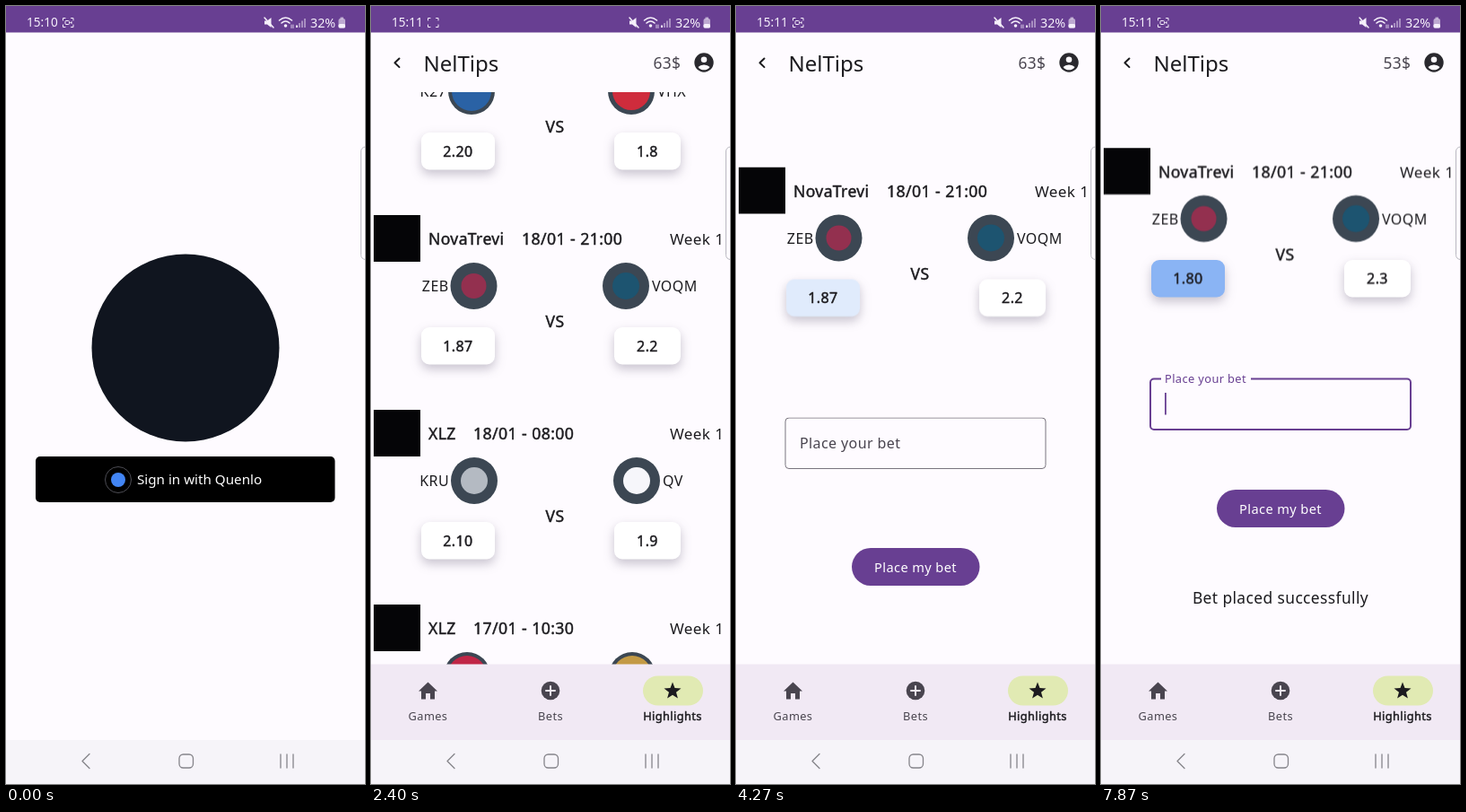
These frames come from a looping animation (400 px wide and 867 px high, 8 s). An HTML page:

```html
<!DOCTYPE html>
<html lang="en">
<head>
<meta charset="utf-8">
<title>Betting app</title>
<style>
  html, body { margin: 0; width: 100%; height: 100%; overflow: hidden; background: #fefbff; }
  svg { display: block; width: 100%; height: 100%; }
  text { font-family: "Noto Sans", "Open Sans", sans-serif; white-space: pre; }
  .raised { filter: drop-shadow(0 5px 6px rgba(50, 45, 75, .27)); }
  .line { fill: none; stroke-linecap: round; stroke-linejoin: round; }
</style>
</head>
<body>
<svg id="stage" viewBox="0 0 400 867"></svg>
<script>
const LOOP = 8000;
const INK = '#1c1b1f', SOFT = '#49454f', PURPLE = '#683f92', PAPER = '#fefbff', PALE = '#f6f0fb';
const WHITE = '#fff', SURFACE = '#f1e9f4', SLATE = '#3c4753';

// Drawing helpers
const attrs = o => Object.entries(o).map(([k, v]) => `${k}="${v}"`).join(' ');
const rect = (x, y, width, height, fill, rx = 0, more = {}) =>
  `<rect ${attrs({ x, y, width, height, fill, rx, ...more })}/>`;
const disc = (cx, cy, r, fill, more = {}) => `<circle ${attrs({ cx, cy, r, fill, ...more })}/>`;
const line = (d, stroke, width = 1.3, more = {}) =>
  `<path class="line" ${attrs({ d, stroke, 'stroke-width': width, ...more })}/>`;
const shape = (d, fill, more = {}) => `<path ${attrs({ d, fill, ...more })}/>`;
const group = (id, ...parts) => `<g id="${id}">${parts.join('')}</g>`;
// y is the middle of the capitals
const text = (x, y, size, str, more = {}) =>
  `<text ${attrs({ x, y: y + size * .36, 'font-size': size, fill: INK, 'letter-spacing': .4, ...more })}>${str}</text>`;
const mid = { 'text-anchor': 'middle' }, end = { 'text-anchor': 'end' }, tight = { 'letter-spacing': 0 };
// A hairline outline gives the medium weight
const medium = { stroke: INK, 'stroke-width': .45 };

// Match cards; a team is [name, avatar centre, mark colour, mark radius]
const matches = [
  { league: 'Vento League', dateX: 198, date: '18/01 - 21:00', odds: ['2.20', '1.8'],
    home: ['K27', 112, '#2a62a5', 22], away: ['VHX', 290, '#cf2c3c', 21] },
  { league: 'NovaTrevi', dateX: 168, date: '18/01 - 21:00', odds: ['1.87', '2.2'],
    home: ['ZEB', 114.5, '#93304f', 14], away: ['VOQM', 284, '#1d5470', 15] },
  { league: 'XLZ', dateX: 114, date: '18/01 - 08:00', odds: ['2.10', '1.9'],
    home: ['KRU', 115, '#b4bac2', 15], away: ['QV', 296, '#f6f6fa', 15] },
  { league: 'XLZ', dateX: 114, date: '17/01 - 10:30', odds: ['', ''],
    home: ['', 107, '#c02646', 22], away: ['', 291, '#c39a45', 22] }
];

function card(m, top, prefix = '') {
  const avatar = ([, x, colour, r]) => disc(x, top + 79, 26, SLATE) + disc(x, top + 79, r, colour);
  const odd = (x, w, str, id) =>
    rect(x, top + 125, w, 41.5, WHITE, 9, { class: 'raised', id: prefix + id + top }) +
    text(x + w / 2, top + 146, 16, str, { ...mid, ...medium, class: prefix + 'old' });
  return rect(3, top, 52, 52, '#050507') +
    text(64, top + 27, 17.5, m.league, medium) +
    text(m.dateX, top + 27, 17.7, m.date, medium) +
    text(333, top + 27, 17, 'Week 1') +
    avatar(m.home) + avatar(m.away) +
    text(m.home[1] - 28, top + 79.5, 16, m.home[0], end) +
    text(m.away[1] + 29, top + 79.5, 16, m.away[0]) +
    text(205, top + 119, 17.5, 'VS', { ...mid, ...medium }) +
    odd(56, 82, m.odds[0], 'odd-a') + odd(271, 74, m.odds[1], 'odd-b');
}

const login = group('login',
  disc(200, 381, 104.5, '#10151f'),
  rect(33, 502, 333.5, 51, '#000', 5),
  disc(125, 528, 14.5, '#000', { stroke: '#4d4d55', 'stroke-width': 1 }),
  disc(125, 528, 8, '#4285f4'),
  text(146, 528, 15.2, 'Sign in with Quenlo', { fill: WHITE, ...tight }));

const header =
  line('M31.5 58.500l-5 4.800 5 4.800', INK, 2) +
  text(58.5, 64, 24, 'NelTips', tight) +
  text(314.5, 63.5, 17.3, '63$', { id: 'before', fill: SOFT }) +
  text(314.5, 63.5, 17.3, '53$', { id: 'after', fill: SOFT }) +
  disc(371, 63, 10.7, '#2a292e') + disc(371, 59.8, 3.3, PAPER) +
  shape('M364.500 68a7.500 5 0 0 1 13 0a8 8 0 0 1-13 0z', PAPER);

const starPath = Array.from({ length: 10 }, (_, i) => {
  const a = i * Math.PI / 5, r = i % 2 ? 4.2 : 10;
  return (336 + r * Math.sin(a)).toFixed(1) + ' ' + (763.5 - r * Math.cos(a)).toFixed(1);
}).join('L');

const tabs = rect(0, 733.5, 400, 84.5, SURFACE) +
  rect(303, 746.5, 67, 33, '#e1eab3', 16.5) +
  shape('M53 763.500L63.500 753.500 74 763.500H71V772.500H66V766H61V772.500H56V763.500z', SOFT) +
  disc(200, 763, 10.3, SOFT) + line('M195 763h10M200 758v10', SURFACE, 2) +
  shape('M' + starPath + 'z', INK) +
  text(63.5, 791.5, 12.8, 'Games', { ...mid, fill: SOFT }) +
  text(200, 791.5, 12.8, 'Bets', { ...mid, fill: SOFT }) +
  text(336, 791.5, 12.8, 'Highlights', { ...mid, ...medium });

const list = group('list',
  `<g clip-path="url(#view)">${group('scroll', ...matches.map((m, i) => card(m, 163 + 217 * i)))}</g>`);

const bet = group('bet',
  group('pick', card(matches[1], 158, 'bet-'),
    text(97, 304, 16, '1.80', { ...mid, ...medium, class: 'new' }),
    text(308, 304, 16, '2.3', { ...mid, ...medium, class: 'new' })),
  group('field',
    group('idle',
      rect(55, 415.5, 290, 56.5, 'none', 4, { stroke: '#79747e', 'stroke-width': 1 }),
      text(71, 444, 16, 'Place your bet', { fill: SOFT })),
    group('focus',
      rect(55, 415.5, 290, 56.5, 'none', 4, { stroke: PURPLE, 'stroke-width': 2 }),
      rect(67, 412, 100, 7, PAPER),
      text(71, 415, 12.8, 'Place your bet', { fill: PURPLE }),
      text(71, 444, 16, '1', { id: 'one' }), text(80.5, 444, 16, '0', { id: 'zero' }),
      rect(71, 431, 1.8, 24.5, PURPLE, 0, { id: 'caret' }))),
  group('place', rect(129, 539, 142.5, 42, PURPLE, 21),
    text(200, 561, 14.6, 'Place my bet', { ...mid, fill: WHITE })),
  text(200, 660, 17.4, 'Bet placed successfully', { ...mid, id: 'done' }));

function keypad() {
  const rows = ['123<', '456~', '789-', ',0. '];
  const keys = rows.map((row, r) => [...row].map((c, i) => {
    const x = 9.5 + 97.4 * i, y = 659 + 65.7 * r, isDigit = c >= '0' && c <= '9';
    const label = c === '<' || c === '~' ? '' : c === '-' ? '.-' : c;
    return rect(x, y, 89, 58, isDigit ? '#fdfdff' : '#c9ccd5', 6) +
      text(x + 44.5, y + 30, isDigit ? 28 : 24, label, { ...mid, fill: '#0a0a0c' });
  }).join('')).join('');
  const tools = [35, 105, 176, 246, 316].map(x => disc(x, 625, 17, '#e4e6ec')).join('');
  return group('keys',
    rect(0, 602, 400, 420, '#e5e6ec'), rect(0, 602, 400, 46, '#f2f3f7'), tools,
    disc(35, 625, 8.5, 'none', { stroke: INK, 'stroke-width': 1.7 }),
    disc(32, 622.5, 1.2, INK), disc(38, 622.5, 1.2, INK), line('M31 627q4 5 8 0', INK, 1.5),
    line('M98 618h14v14.500h-14zM102 618v3h6v-3', INK, 1.7),
    line('M169 617.500h14v15h-14z', INK, 1.7),
    line('M173 622h0M176 622h0M179 622h0M173 625h0M176 625h0M179 625h0M174 629h4', INK, 1.6),
    rect(243, 616, 6, 11, 'none', 3, { stroke: INK, 'stroke-width': 1.6 }),
    line('M239.500 624q0 6.500 6.500 6.500t6.500-6.500M246 631v3', INK, 1.6),
    line('M314 617h4l1 2.500 3-.500 2 3.500-2 2.500 2 2.500-2 3.500-3-.500-1 2.500h-4l-1-2.500-3 .500-2-3.500 2-2.500-2-2.500 2-3.500 3 .500z', INK, 1.5),
    disc(316, 625, 2.6, 'none', { stroke: INK, 'stroke-width': 1.4 }),
    [369.5, 375.5, 381.5].map(x => disc(x, 625, 1.8, INK)).join(''),
    keys,
    line('M339 678h19q3 0 3 3v14q0 3-3 3h-19l-8-10zM343.500 684l8 8m0-8l-8 8', INK, 2.2),
    line('M360 741v13q0 4-4 4h-23m7-7l-7 7 7 7', INK, 2.2));
}

const GREY = '#85848a';
const systemNav =
  line('M93 833.500l-8 8 8 8', GREY, 1.3, { id: 'back' }) +
  group('hide', line('M81 837l8 8 8-8', GREY),
    rect(367, 836, 19, 11, 'none', 1, { stroke: GREY, 'stroke-width': 1 }),
    line('M370 839.500h13M370 842h13', GREY, 1.4, { 'stroke-dasharray': '.1 3' }),
    line('M373 844.500h7', GREY, 1)) +
  rect(193, 834, 15.5, 15, 'none', 4.5, { stroke: GREY, 'stroke-width': 1.3 }) +
  line('M306 834v15M313 834v15M320 834v15', GREY);

const status = rect(0, 0, 400, 29.5, PURPLE) +
  text(23, 18.5, 13.6, '15:10', { id: 'early', fill: PALE, ...tight }) +
  text(23, 18.5, 13.6, '15:11', { id: 'late', fill: PALE, ...tight }) +
  line('M63.500 16v-2.500h2.500M72.500 13.500h2.500V16M75 21v2.500h-2.500M66 23.500h-2.500V21', PALE, 1) +
  group('cam', rect(66, 16.5, 4.5, 4, 'none', 1, { stroke: PALE, 'stroke-width': 1 }),
    shape('M71 18.500l2.500-1.500v3z', PALE)) +
  shape('M288 16.500h3l4.500-3.500v11l-4.500-3.500h-3z', PALE) + line('M288 13l10 11', PALE, 1.5) +
  line('M304.500 16q7-6 14 0M307 19q4.500-4 9 0', PALE, 1.6) + disc(311.5, 22, 1.8, PALE) +
  line('M318 21v3.500M320 21v3.500', PALE, .8) +
  [0, 1, 2, 3].map(i => rect(323 + i * 3, 21.5 - i * 2.5, 2, 2.5 + i * 2.5, PALE, 0,
    { opacity: i ? .45 : 1 })).join('') +
  text(339, 18.5, 14.3, '32%', { fill: PALE, ...tight }) +
  rect(370.5, 14, 7.5, 10.5, PALE, 2, { opacity: .6 }) + rect(370.5, 20, 7.5, 4.5, PALE, 1.5) +
  rect(372.5, 12.5, 3.5, 2, PALE, 0, { opacity: .6 });

document.getElementById('stage').innerHTML =
  '<clipPath id="view"><rect y="96" width="400" height="638"/></clipPath>' +
  rect(0, 0, 400, 867, PAPER) + login +
  group('app', group('pan', header, list, bet, tabs)) +
  rect(0, 818, 400, 49, '#f6f4f9') + keypad() + systemNav + status +
  rect(395.5, 157, 12, 125.5, PAPER, 5, { stroke: '#b9b7c0', 'stroke-width': 1 }) +
  disc(0, 0, 9, WHITE, { id: 'touch', 'fill-opacity': .6, stroke: '#b4b2bc', 'stroke-width': 1 });

// Motion helpers: steps are [time, value, easing]
function play(target, prop, steps, ease = 'linear') {
  const frames = steps.map(([t, v, easing = ease]) => ({ offset: t / LOOP, [prop]: v, easing }));
  if (steps[0][0] > 0) frames.unshift({ ...frames[0], offset: 0 });
  frames.push({ offset: 1, [prop]: steps[steps.length - 1][1] });
  for (const el of document.querySelectorAll(target)) {
    el.animate(frames, { duration: LOOP, iterations: Infinity });
  }
}
const HARD = 'step-end';
const fade = (target, steps) => play(target, 'opacity', steps);
const slide = (target, steps) =>
  play(target, 'transform', steps.map(([t, y, e]) => [t, `translate(0px, ${y}px)`, e]));
// Flips between shown and hidden at each time
const flip = (target, shown, ...times) =>
  play(target, 'opacity', [0, ...times].map((t, i) => [t, (i % 2 === 0) === shown ? 1 : 0]), HARD);

const SENT = 6870;
fade('#login', [[0, 1], [330, 1], [480, 0]]);
fade('#app', [[0, 0], [330, 0], [480, 1]]);
flip('#early', true, 400);
flip('#late', false, 400);
flip('#cam', true, 600, 1530, 2150, 2780, 3410, 4040, 4670, 5300, 5930, 6570, 7200, 7870);

slide('#scroll', [[0, 0], [1550, 0], [1800, -82.5, 'ease-out'], [2390, -147], [2800, -147],
  [3050, -35, 'ease-out'], [3330, 0]]);
fade('#list', [[0, 1], [3720, 1], [3950, 0]]);
fade('#bet', [[0, 0], [3720, 0], [3950, 1]]);
play('#bet-odd-a158', 'fill', [[0, WHITE], [4200, WHITE], [4470, '#8ab4f4']]);

// The column spreads evenly, so it tightens once the message joins it
slide('#pick', [[0, 21.5, HARD], [SENT, 0]]);
slide('#field', [[0, 43.5, HARD], [SENT, 0]]);
slide('#place', [[0, 65, HARD], [SENT, 0]]);
flip('#done', false, SENT);

flip('#idle', true, 5130);
flip('#focus', false, 5130);
flip('#one', false, 5740, SENT);
flip('#zero', false, 5870, SENT);
play('#caret', 'transform', [[0, 0], [5740, 9.5], [5870, 19], [SENT, 0]]
  .map(([t, x]) => [t, `translate(${x}px, 0px)`]), HARD);

slide('#pan', [[0, 0], [5330, 0], [5440, -21.5], [6070, -21.5], [6300, 0]]);
slide('#keys', [[0, 270], [5330, 270], [5470, 0, 'ease-out'], [5640, -101],
  [6070, -101, 'ease-in'], [6330, 270]]);
flip('#back', true, 5330, 6330);
flip('#hide', false, 5330, 6330);

flip('.bet-old', true, 7330);
flip('.new', false, 7330);
flip('#before', true, 7870);
flip('#after', false, 7870);

// Touches: start, end, x, y, and y at release
const touches = [
  [130, 270, 200, 528], [1550, 1860, 338, 542.5, 440], [2800, 3050, 338, 400, 512],
  [3590, 3690, 97, 525], [4130, 4230, 97, 325], [4870, 4930, 237.5, 486.5],
  [5690, 5750, 54, 587], [5810, 5870, 151, 784], [6490, 6600, 200, 625]
];
flip('#touch', false, ...touches.flatMap(([a, b]) => [a, b]));
play('#touch', 'transform', touches.flatMap(([a, b, x, y, y2 = y]) =>
  [[a, `translate(${x}px, ${y}px)`, 'linear'], [b, `translate(${x}px, ${y2}px)`, HARD]]));
</script>
</body>
</html>
```
